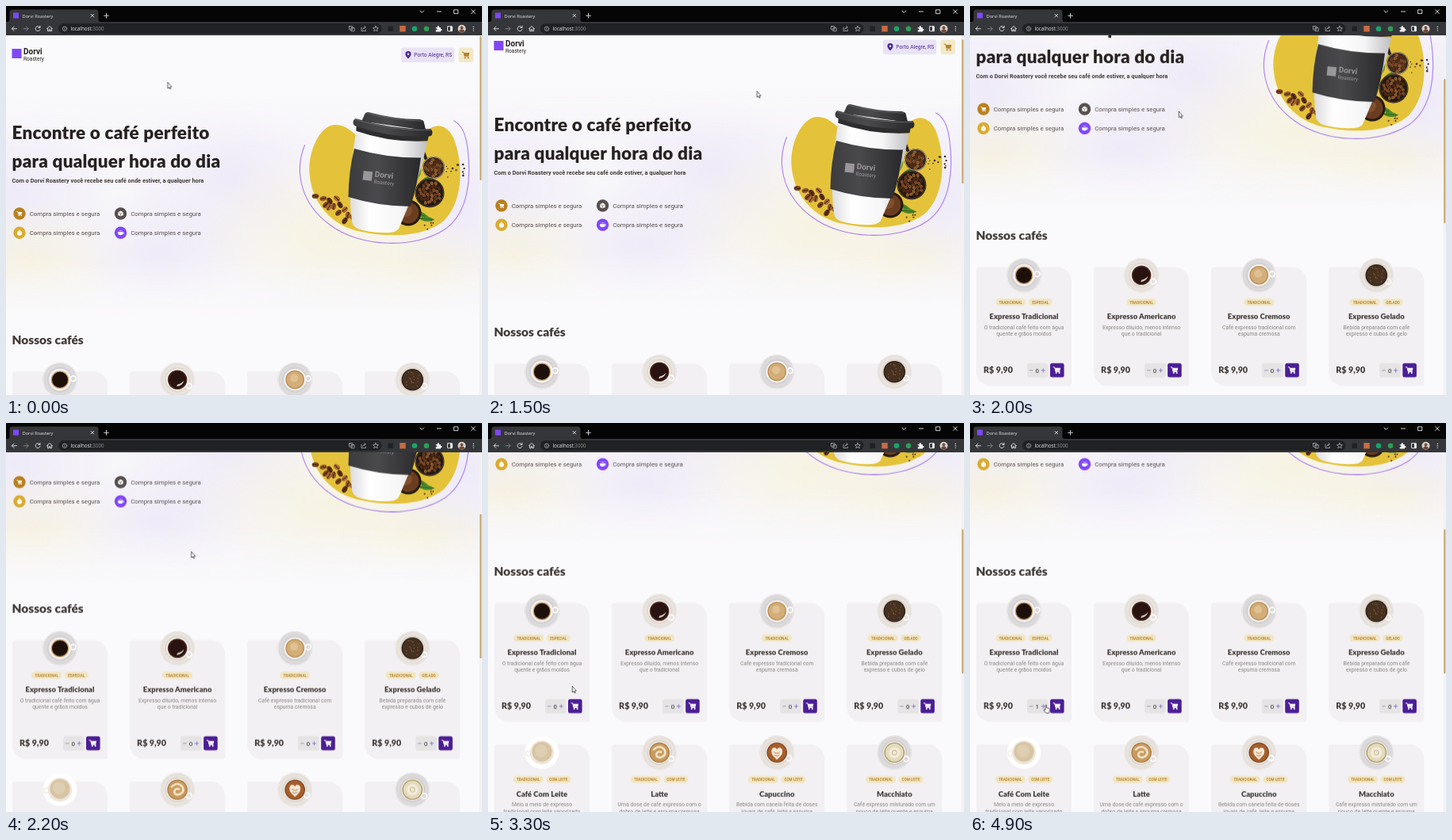
Recreate the animation shown at these times as an HTML page. Size 600x491 px, loop 5 s.

```html
<!DOCTYPE html>
<html lang="pt-BR">
<head>
<meta charset="utf-8">
<title>Dorvi Roastery</title>
<style>
html, body { margin: 0; width: 100%; height: 100%; overflow: hidden; background: #faf9fb; }
svg { display: block; width: 100vw; height: 100vh; }
text { font-family: Roboto, Arial, sans-serif; white-space: pre; }
.h { font-family: Lato, 'Open Sans', sans-serif; font-weight: 900; }
.ui { font-family: 'Open Sans', 'Noto Sans', sans-serif; }
.bold { font-weight: 700; }
.mid { text-anchor: middle; }
.line { fill: none; stroke-linecap: round; stroke-linejoin: round; }
#page, #thumb { animation: scroll 5s infinite; }
#page { --k: -1px; }
#thumb { --k: .411px; }
#pointer { animation: move 5s infinite; }
#arrow { animation: leave 5s step-end infinite; }
#hand { animation: enter 5s step-end infinite; }
#zero { animation: leaveCount 5s step-end infinite; }
#one { animation: enterCount 5s step-end infinite; }
@keyframes scroll {
  0% { transform: none; animation-timing-function: step-end; }
  28% { transform: translateY(0); animation-timing-function: steps(2); }
  32% { transform: translateY(calc(var(--k) * 20)); animation-timing-function: steps(2); }
  36% { transform: translateY(calc(var(--k) * 76.4)); animation-timing-function: steps(4); }
  44% { transform: translateY(calc(var(--k) * 187.4)); animation-timing-function: steps(2); }
  48% { transform: translateY(calc(var(--k) * 214)); animation-timing-function: steps(4); }
  56% { transform: translateY(calc(var(--k) * 228.3)); animation-timing-function: steps(2); }
  60%, 100% { transform: translateY(calc(var(--k) * 234.3)); }
}
@keyframes move {
  0% { transform: translate(203.5px, 96px); animation-timing-function: steps(7); }
  14% { transform: translate(416px, 114.3px); animation-timing-function: steps(4); }
  22% { transform: translate(400px, 112px); animation-timing-function: steps(7); }
  36% { transform: translate(292.7px, 103.5px); animation-timing-function: steps(4); }
  44% { transform: translate(233.3px, 162px); animation-timing-function: steps(6); }
  56% { transform: translate(119.5px, 302.5px); animation-timing-function: steps(9); }
  74%, 100% { transform: translate(95px, 355.5px); }
}
@keyframes leave { 0% { opacity: 1; } 74%, 100% { opacity: 0; } }
@keyframes enter { 0% { opacity: 0; } 74%, 100% { opacity: 1; } }
@keyframes leaveCount { 0% { opacity: 1; } 92%, 100% { opacity: 0; } }
@keyframes enterCount { 0% { opacity: 0; } 92%, 100% { opacity: 1; } }
</style>
</head>
<body>
<svg viewBox="0 0 600 491" preserveAspectRatio="none">
<defs>
  <radialGradient id="sun"><stop offset="0" stop-color="#f7f1d2" stop-opacity=".6"/><stop offset="1" stop-color="#f7f1d2" stop-opacity="0"/></radialGradient>
  <radialGradient id="lilac"><stop offset="0" stop-color="#e9e3f7" stop-opacity=".6"/><stop offset="1" stop-color="#e9e3f7" stop-opacity="0"/></radialGradient>
  <linearGradient id="fade" x2="0" y2="1"><stop offset="0" stop-color="#000"/><stop offset=".25" stop-color="#fff"/><stop offset=".75" stop-color="#fff"/><stop offset="1" stop-color="#000"/></linearGradient>
  <mask id="soft"><rect y="110" width="600" height="282" fill="url(#fade)"/></mask>
  <linearGradient id="paper"><stop offset="0" stop-color="#dcdcdf"/><stop offset=".25" stop-color="#fff"/><stop offset=".65" stop-color="#f6f6f7"/><stop offset="1" stop-color="#bfbfc3"/></linearGradient>
  <linearGradient id="dark"><stop offset="0" stop-color="#3c3b3e"/><stop offset=".4" stop-color="#4a494c"/><stop offset="1" stop-color="#29282b"/></linearGradient>
  <radialGradient id="china"><stop offset=".55" stop-color="#c4c1c2"/><stop offset=".8" stop-color="#dedcdd"/><stop offset="1" stop-color="#d5d3d4"/></radialGradient>
  <radialGradient id="cream"><stop offset=".55" stop-color="#d0c8c0"/><stop offset=".8" stop-color="#ebe6e0"/><stop offset="1" stop-color="#e0d9d2"/></radialGradient>
  <g id="cart">
    <path class="line" stroke="currentColor" stroke-width="1" d="M-4.6-3.6h1.7l1.3 5.6h5"/>
    <path fill="currentColor" d="M-2.6-2.8h7.2L3.6 1.2h-5.3z"/>
    <circle cx="-1" cy="3.6" r="1" fill="currentColor"/><circle cx="3" cy="3.6" r="1" fill="currentColor"/>
  </g>
</defs>
<rect width="600" height="491" fill="#faf9fb"/>

<g id="page">
  <g mask="url(#soft)">
    <rect y="110" width="600" height="282" fill="#f6f3f9" opacity=".6"/>
    <ellipse cx="15" cy="240" rx="120" ry="120" fill="url(#lilac)"/>
    <ellipse cx="30" cy="325" rx="130" ry="80" fill="url(#sun)"/>
    <ellipse cx="280" cy="215" rx="130" ry="110" fill="url(#lilac)"/>
    <ellipse cx="195" cy="310" rx="120" ry="80" fill="url(#lilac)"/>
    <ellipse cx="410" cy="290" rx="170" ry="110" fill="url(#sun)"/>
    <ellipse cx="575" cy="250" rx="110" ry="125" fill="url(#lilac)"/>
    <ellipse cx="530" cy="335" rx="110" ry="60" fill="url(#sun)"/>
  </g>

  <rect x="7.5" y="54" width="12" height="12" fill="#8047f8"/>
  <text class="bold" x="22" y="61" font-size="10" fill="#272221">Dorvi</text>
  <text x="22" y="69.3" font-size="6.6" fill="#272221">Roastery</text>
  <rect x="498" y="52.5" width="67.3" height="18.5" rx="3" fill="#e9e3f5"/>
  <path d="M507 66.5c-2-2.4-3.6-4-3.6-5.8a3.6 3.6 0 0 1 7.2 0c0 1.8-1.6 3.4-3.6 5.8z" fill="#4b2995"/>
  <circle cx="507" cy="60.7" r="1.3" fill="#e9e3f5"/>
  <text x="514.3" y="64.2" font-size="6.65" fill="#4b2995">Porto Alegre, RS</text>
  <rect x="570.5" y="52.5" width="18.5" height="18.5" rx="3" fill="#f1e9c9"/>
  <use href="#cart" x="579.7" y="61.8" color="#b9802a"/>

  <g fill="#272221" font-size="22.5" letter-spacing=".22">
    <text class="h" x="7.5" y="168.3">Encontre o café perfeito</text>
    <text class="h" x="7.5" y="204.3">para qualquer hora do dia</text>
  </g>
  <text class="bold" x="7.5" y="222.5" font-size="7.4" fill="#403937">Com o Dorvi Roastery você recebe seu café onde estiver, a qualquer hora</text>
  <g id="perks" font-size="7.85" fill="#574f4d"></g>

  <g id="art">
    <path d="M382.5 211C380.500 184 395.500 151 414 150C428 149 434 158 446 166C480 178 512 178 530 158C545 144 562 152 568 178C576 208 575 246 553 270C530 291 485 293 448 285C410 278 385 248 382.500 211z" fill="#e4c33a"/>
    <path class="line" stroke="#a97ff0" stroke-width="1.100" d="M376.500 175.500C362 212 374 251 408 276C446 305 515 307 553 282C585 260 586 212 582 181C580 163 575 150 564.500 145"/>
    <g id="beans"></g>
    <path d="M441 160L531 172Q520 226 496 279Q494 285 484 286Q459 287 443 281Q437 278 436 272Q430 226 441 160z" fill="url(#paper)"/>
    <path d="M439 180Q480 192 523 191.500Q519 225 510 253Q470 253 431.500 241Q432 208 439 180z" fill="url(#dark)"/>
    <g transform="translate(487 156) rotate(8)">
      <path d="M-40-5L-37-15Q-36-17.500-32-17.500Q0-13.500 32-17.500Q37-17.500 38-15L42-5z" fill="url(#dark)"/>
      <path d="M-46-4Q0 4 47-4L46 8Q0 17-45 8z" fill="#2d2c2f"/>
      <path d="M-48-7.500Q-51-5-50-1Q-49 2-45 2.500Q0 11 45 2.500Q50 2 50.500-1.500Q51-5 48-7.500Q0 0-48-7.500z" fill="url(#dark)"/>
      <path class="line" stroke="#69686b" stroke-width=".8" d="M-35-16Q0-12 35-16M-48-6Q0 2 48-6"/>
    </g>
    <g transform="rotate(6 450 215)" fill="#99979a">
      <rect x="450" y="208" width="11.500" height="11.500"/>
      <text class="bold" x="464.500" y="214" font-size="10">Dorvi</text>
      <text x="464" y="222.500" font-size="6.600">Roastery</text>
    </g>
  </g>

  <text class="h" x="7.5" y="427.3" font-size="15.5" fill="#403937">Nossos cafés</text>
  <g id="cards"></g>
</g>

<rect x="596.5" y="37" width="3.5" height="454" fill="#f4f1f2"/>
<rect id="thumb" x="597.2" y="38" width="2.2" height="182" rx="1" fill="#c9a873"/>

<g id="chrome">
  <rect width="600" height="37" fill="#35363a"/>
  <rect width="600" height="20" fill="#050505"/>
  <path d="M2 20Q4.5 20 4.5 17V8Q4.5 4.5 8 4.5H113Q116.5 4.5 116.5 8V17Q116.5 20 119 20z" fill="#35363a"/>
  <rect x="9" y="8.5" width="7" height="7" fill="#8047f8"/>
  <text class="ui" x="20.5" y="14.5" font-size="5.7" fill="#e8eaed">Dorvi Roastery</text>
  <g class="line" stroke="#e4e5e8" stroke-width=".9">
    <path d="M107 10.3l3.6 3.6m0-3.6l-3.6 3.6M126.5 9.3v5.8m-2.9-2.9h5.8"/>
    <path d="M522 6l2.3 2.3l2.3-2.3M543.5 7h5M565 4.8h4.8v4.8h-4.8zM586.7 4.7l4.8 4.8m0-4.8l-4.8 4.8"/>
    <path d="M13.5 28.7H7.5m2.5-2.7l-2.7 2.7l2.7 2.7"/>
    <path stroke="#85878b" d="M22 28.7h6m-2.5-2.7l2.7 2.7l-2.7 2.7"/>
    <path d="M42.7 27a3 3 0 1 0 .3 2.6M43 25.2v2.2h-2.2"/>
    <path d="M51.5 28.7l3.5-3.2l3.5 3.2M52.6 28.3v3.4h1.7v-2h1.4v2h1.7v-3.4"/>
  </g>
  <rect x="66" y="22" width="407.5" height="13" rx="6.5" fill="#202124"/>
  <g class="line" stroke="#bfc1c5" stroke-width=".7">
    <circle cx="74" cy="28.7" r="2.7"/><path d="M74 28.5v1.5m0-2.9v.1"/>
    <rect x="432.5" y="25.5" width="4.5" height="4.5" rx=".5"/><rect x="435" y="27.5" width="4.3" height="4.3" rx=".5"/>
    <path d="M448 27v4.5h5.5v-1.5M449.5 29.5q.5-2.7 3.5-2.7m-1.3-1.5l1.6 1.5l-1.6 1.5"/>
    <path d="M466 25.2l1 2.3 2.5.2-1.9 1.6.6 2.4-2.2-1.3-2.2 1.3.6-2.4-1.9-1.6 2.5-.2z"/>
  </g>
  <text class="ui" x="81.5" y="31" font-size="6.250" fill="#e8eaed">localhost<tspan fill="#8f9297">:3000</tspan></text>
  <rect x="481.5" y="25.5" width="6.5" height="6.5" fill="#202124"/>
  <rect x="496.3" y="25" width="7.4" height="7.4" fill="#c96b43"/>
  <circle cx="515" cy="28.7" r="3.3" fill="#16a66a"/>
  <circle cx="530" cy="28.7" r="3.3" fill="#2f9e55"/>
  <path d="M541.7 27h2v-.8a1.1 1.1 0 0 1 2.2 0v.8h2v2h.6a1.1 1.1 0 0 1 0 2.2h-.6v1.3h-6.2v-2.2h.8a1 1 0 0 0 0-2h-.8z" fill="#f1f3f4"/>
  <rect x="556.5" y="25.7" width="6" height="6" rx=".6" class="line" stroke="#f1f3f4" stroke-width=".9"/>
  <rect x="560" y="25.7" width="2.5" height="6" fill="#f1f3f4"/>
  <circle cx="574.5" cy="28.7" r="5" fill="#d8d0cb"/>
  <circle cx="574.5" cy="27.3" r="1.9" fill="#6f4a3b"/>
  <path d="M571 32.2q.5-3 3.5-3t3.5 3q-3.5 3-7 0z" fill="#6f4a3b"/>
  <g fill="#e4e5e8"><circle cx="589.3" cy="26.3" r=".7"/><circle cx="589.3" cy="28.7" r=".7"/><circle cx="589.3" cy="31.1" r=".7"/></g>
</g>

<g id="pointer" stroke="#222" stroke-width=".7" fill="#fff" stroke-linejoin="round">
  <path id="arrow" d="M.3.3V8L2 6.5L3.2 9L4.3 8.5L3.2 6.1H5.4z"/>
  <path id="hand" d="M0 .8Q.8-.3 1.5.8V4L5 4.8Q5.6 5.2 5.4 6.5L4.7 10.5H.8L-2 7Q-2.2 5.5-.8 6.2L0 7z"/>
</g>
</svg>

<script>
const put = (id, html) => document.getElementById(id).innerHTML = html;
const circle = (x, y, r, fill, more = '') => `<circle cx="${x}" cy="${y}" r="${r}" fill="${fill}" ${more}/>`;
const ring = (x, y, r, color, w) => circle(x, y, r, 'none', `stroke="${color}" stroke-width="${w}"`);
const rect = (x, y, w, h, r, fill) => `<rect x="${x}" y="${y}" width="${w}" height="${h}" rx="${r}" fill="${fill}"/>`;
const text = (x, y, size, fill, str, more = '') => `<text x="${x}" y="${y}" font-size="${size}" fill="${fill}" ${more}>${str}</text>`;
const path = (d, fill, more = '') => `<path d="${d}" fill="${fill}" ${more}/>`;
let seed = 7;
const rnd = () => (seed = seed * 16807 % 2147483647) / 2147483647;

// Hero benefits
const glyphs = [
  '<use href="#cart" transform="scale(.72)" color="#fff"/>',
  path('M0-3.5L3.2-1.8V1.9L0 3.6L-3.2 1.9V-1.8z', '#fff') + path('M-3-1.7L0 0L3-1.7M0 0V3.5', 'none', 'stroke="#574f4d" stroke-width=".6"'),
  circle(0, .5, 3, '#fff') + rect(-1, -3.7, 2, 1, 0, '#fff') + path('M0 .5L1.3-.8', 'none', 'stroke="#dbac2c" stroke-width=".6"'),
  path('M-3.5-1H3v1Q3 3-.3 3T-3.5 0z', '#fff') + ring(3, .3, 1.1, '#fff', .7) + path('M-1.5-3.3v1.3M0-3.3v1.3M1.5-3.3v1.3', 'none', 'stroke="#fff" stroke-width=".6"')
];
put('perks', ['#b9801f', '#574f4d', '#d9ab31', '#8047f8'].map((color, i) => {
  const x = 17 + i % 2 * 127.5, y = 262 + (i >> 1) * 24.3;
  return `<g transform="translate(${x} ${y})">${circle(0, 0, 7.7, color)}${glyphs[i]}</g>` +
    `<text x="${x + 12.7}" y="${y + 2.6}">Compra simples e segura</text>`;
}).join(''));

// Hero beans, bowls and leaves
const bean = (x, y, s, tone) => `<g transform="translate(${x} ${y}) rotate(${rnd() * 180 | 0}) scale(${s})">` +
  `<ellipse rx="4" ry="2.8" fill="${tone}"/>` + path('M-3.5 0Q-1-1 0 0T3.5 0', 'none', 'stroke="#2f1609" stroke-width=".8"') + '</g>';
const tones = ['#7a431f', '#95592c', '#5c2f15', '#a86a38'];
const fillBowl = (x, y, r, n) => {
  let s = '';
  for (let i = 0; i < n; i++) {
    const a = i * 2.4, d = r * Math.sqrt((i + .5) / n);
    s += bean(x + d * Math.cos(a), y + d * Math.sin(a), .62, tones[i % 4]);
  }
  return s;
};
const leaf = (x, y, a, len) => path(`M0 0Q${len / 2}-6 ${len} 0Q${len / 2} 6 0 0z`, '#4c8a2b', `transform="translate(${x} ${y}) rotate(${a})"`) +
  path(`M0 0H${len}`, 'none', `stroke="#285a18" stroke-width=".7" transform="translate(${x} ${y}) rotate(${a})"`);
const loose = [[390, 240], [400, 243], [408, 246], [417, 243], [403, 251], [413, 253], [421, 251], [427, 257], [419, 261], [431, 264], [427, 271], [407, 254], [443, 270], [437, 267]];
let art = loose.map(([x, y], i) => bean(x, y, 1.1, tones[i % 4])).join('');
art += leaf(516, 221, -70, 20) + leaf(522, 222, -20, 20) + leaf(517, 258, 35, 24) + leaf(514, 226, -120, 18) + leaf(520, 268, 5, 20);
art += path('M529 192L526 184', 'none', 'stroke="#2a2320" stroke-width="4" stroke-linecap="round"');
art += circle(539, 204, 14, '#3a2a20') + ring(539, 204, 13.5, '#b9a58c', 1) + fillBowl(539, 204, 11, 20);
art += circle(534, 236, 18.5, '#241a15') + ring(534, 236, 17.5, '#5a4638', 1) + fillBowl(534, 236, 14.5, 32);
art += circle(507, 261, 16.5, '#241a15') + circle(507, 261, 13.5, '#6b3d20') + circle(504, 258, 8, '#80502d');
for (let i = 0; i < 14; i++) art += circle(555 + rnd() * 24, 198 + rnd() * 18, .6 + rnd() * .8, '#3d2418');
for (let i = 0; i < 5; i++) art += circle(526 + rnd() * 14, 271 + rnd() * 12, 1, '#4a2815');
put('beans', art);

// Cups, each centred on its saucer
const cup = (coffee, rim, { plate = 'china', tilt = -5, r = 10.5, extra = '' } = {}) =>
  circle(0, 0, 21.7, `url(#${plate})`) + ring(0, 0, 21, '#efedec', 1) +
  `<g transform="rotate(${tilt})">` + ring(16.8, 0, 3.3, '#fff', 1.7) + '</g>' +
  circle(0, 0, 14, '#f4f2f1') + circle(0, 0, r + 1.3, rim) + circle(0, 0, r, coffee) + extra;
const specks = Array.from({ length: 16 }, (_, i) => {
  const a = i * 2.4, d = 2 + rnd() * 9;
  return circle((d * Math.cos(a)).toFixed(1), (d * Math.sin(a)).toFixed(1), .8, '#82613f');
}).join('');
const cups = [
  cup('#1d100a', '#c49b62', { r: 10 }),
  cup('#291310', '#5a3426', { plate: 'cream', tilt: 28, r: 11, extra: path('M-1 8.5Q6 8 8.5 1Q5 5 0 6z', '#d9d2cd') }),
  cup('#d3ae78', '#b98d55', { extra: circle(-1, -2, 5, '#e0c193') }),
  cup('#46301f', '#2d1e15', { plate: 'cream', tilt: 28, r: 12.5, extra: specks }),
  '<ellipse rx="21.5" ry="20.5" fill="#fff"/>' + ring(-17, 1, 3.3, '#f4f0ea', 2) + circle(0, 0, 15, '#ece6dc') + circle(0, -1, 12.5, '#d8c4a2') + circle(-1, -2, 8, '#dfcfb2'),
  cup('#c99b5f', '#ab753c', { plate: 'cream', tilt: 28, r: 11.5, extra: path('M-8-3Q0-11 6-4Q10 3 2 6Q-4 7-4 2Q-2-3 3 0', 'none', 'stroke="#f3e3c7" stroke-width="2.6"') }),
  cup('#a65f2b', '#7b421d', { plate: 'cream', tilt: 25, r: 11.5, extra: path('M0 9Q-10 1-6-5Q-2-8 0-4Q2-8 6-5Q10 1 0 9z', '#f6e9d7') + path('M-4-1Q0 3 4-1M-3 3Q0 6 3 3', 'none', 'stroke="#b67a46" stroke-width="1"') }),
  cup('#e4dabd', '#a99458', { tilt: 28, r: 11.5, extra: circle(0, 0, 7, '#f2ecdb') + ring(0, 0, 3, '#c6b07e', 1) })
];

// Product cards
const T = 'TRADICIONAL', E = 'ESPECIAL', G = 'GELADO', L = 'COM LEITE';
const tagWidth = { [T]: 38, [E]: 30, [G]: 25.5, [L]: 31 };
const items = [
  ['Expresso Tradicional', [T, E], 'O tradicional café feito com água', 'quente e grãos moídos'],
  ['Expresso Americano', [T], 'Expresso diluído, menos intenso', 'que o tradicional'],
  ['Expresso Cremoso', [T], 'Café expresso tradicional com', 'espuma cremosa'],
  ['Expresso Gelado', [T, G], 'Bebida preparada com café', 'expresso e cubos de gelo'],
  ['Café Com Leite', [T, L], 'Meio a meio de expresso', 'tradicional com leite vaporizado'],
  ['Latte', [T, L], 'Uma dose de café expresso com o', 'dobro de leite e espuma cremosa'],
  ['Capuccino', [T, L], 'Bebida com canela feita de doses', 'iguais de café, leite e espuma'],
  ['Macchiato', [T, L], 'Café expresso misturado com um', 'pouco de leite quente e espuma']
];
const tagRow = tags => {
  let x = 60 - (tags.reduce((sum, t) => sum + tagWidth[t], 0) + (tags.length - 1) * 3.5) / 2;
  return tags.map(t => {
    const w = tagWidth[t], s = rect(x, 39.8, w, 9, 4.5, '#f1e6c3') + text(x + w / 2, 46, 4.6, '#b9842f', t, 'class="mid bold"');
    x += w + 3.5;
    return s;
  }).join('');
};
put('cards', items.map(([name, tags, a, b], i) => {
  const count = (id, n) => text(76.8, 133, 7.8, '#272221', n, `class="mid" ${id}`);
  return `<g transform="translate(${8 + i % 4 * 148.1} ${461.5 + (i >> 2) * 178.5})">` +
    path('M3 0H102A18 18 0 0 1 120 18V147A3 3 0 0 1 117 150H18A18 18 0 0 1 0 132V3A3 3 0 0 1 3 0z', '#f2f0f2') +
    `<g transform="translate(60 10.2)">${cups[i]}</g>` + tagRow(tags) +
    text(60, 65.5, 9.45, '#403937', name, 'class="mid h"') +
    text(60, 78.3, 6.85, '#8d8686', a, 'class="mid"') + text(60, 86.5, 6.85, '#8d8686', b, 'class="mid"') +
    text(9, 133.3, 10.7, '#403937', 'R$ 9,90', 'class="h"') +
    rect(64, 121.3, 26.5, 18, 3, '#e5e3e4') +
    path('M67 130.3h4.4', 'none', 'stroke="#9a8fb5" stroke-width=".9"') +
    path('M81.8 130.3h5m-2.5-2.5v5', 'none', 'stroke="#8a72cf" stroke-width=".9"') +
    (i ? count('', 0) : count('id="zero"', 0) + count('id="one"', 1)) +
    rect(93, 121.3, 17.6, 17.8, 2.5, '#4b1e94') + '<use href="#cart" x="101.6" y="130" color="#fff"/></g>';
}).join(''));
</script>
</body>
</html>
```
